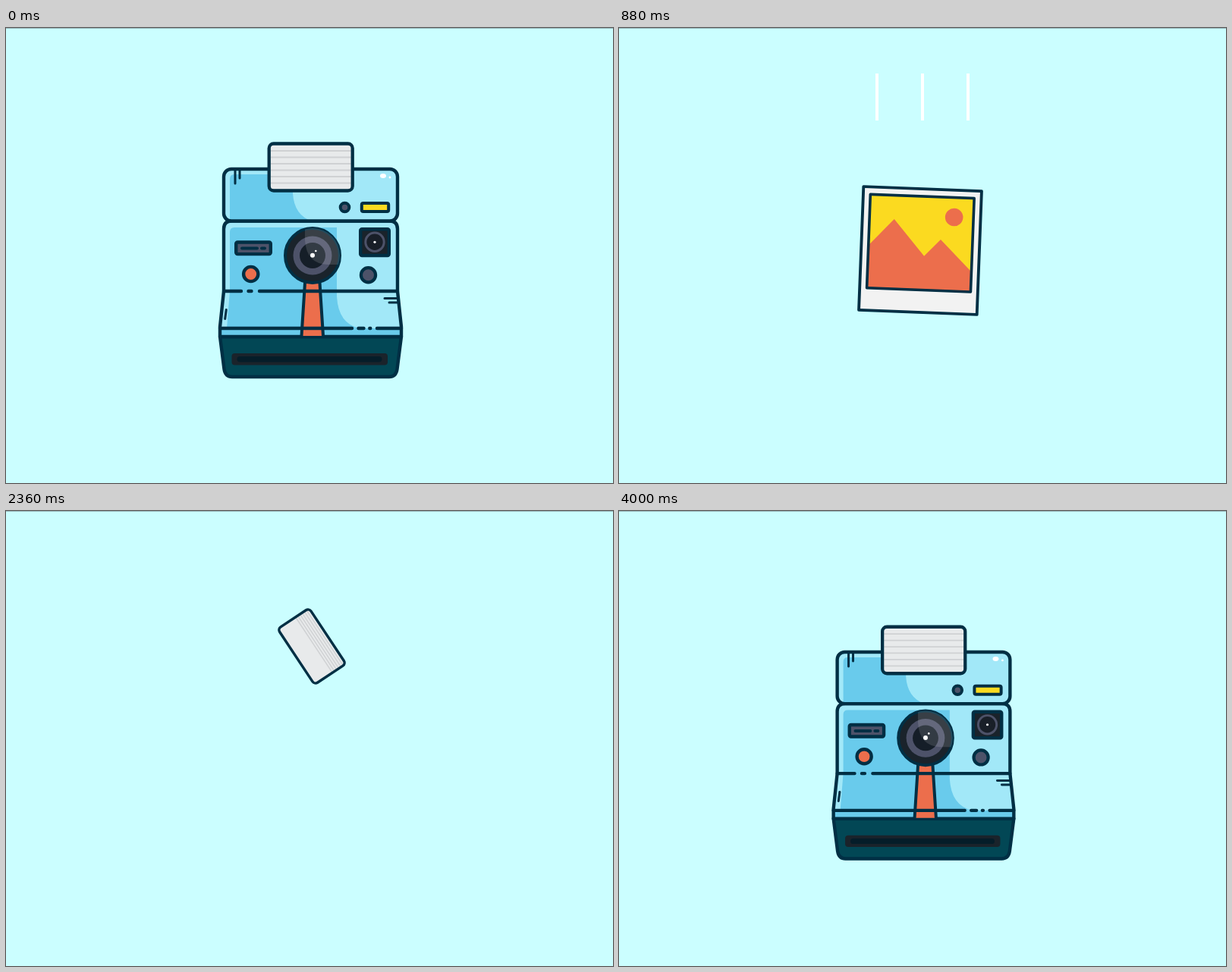
An HTML page with a canvas that plays this animation: 800 by 600 pixels, repeating every 4040 ms.

```html
<!DOCTYPE html>
<html lang="en">
<head>
<meta charset="utf-8">
<title>Instant camera</title>
<style>
html, body { margin: 0; width: 100%; height: 100%; overflow: hidden; background: #cbfeff; }
canvas { display: block; }
</style>
</head>
<body>
<canvas id="stage" width="800" height="600"></canvas>
<script>
const ctx = document.getElementById('stage').getContext('2d');
const LOOP = 4040, CX = 401.7, CY = 183.5;
const NAVY = '#002f44', BLUE = '#69cbec', LIGHT = '#a2e8f8', DEEP = '#024755',
  ORANGE = '#ec6e4c', YELLOW = '#fbda20', GREY = '#4d5269', DARK = '#1a232b';

const clamp = x => Math.min(1, Math.max(0, x));
const part = (t, a, b) => clamp((t - a) / (b - a));
const mix = (a, b, p) => a + (b - a) * p;
const smooth = p => (1 - Math.cos(Math.PI * p)) / 2;
const back = p => 1 + 2.4 * (p - 1) ** 3 + 1.4 * (p - 1) ** 2;

// Eased value through alternating times and values.
function key(t, ...k) {
  let i = 0;
  while (i < k.length - 4 && t > k[i + 2]) i += 2;
  return mix(k[i + 1], k[i + 3], smooth(part(t, k[i], k[i + 2])));
}

function paint(fill, stroke, width = 4.4) {
  if (fill) { ctx.fillStyle = fill; ctx.fill(); }
  if (stroke) { ctx.strokeStyle = stroke; ctx.lineWidth = width; ctx.stroke(); }
}
function box(x, y, w, h, r, fill, stroke, width) {
  ctx.beginPath(); ctx.roundRect(x, y, w, h, r); paint(fill, stroke, width);
}
function disc(x, y, r, fill, stroke, width) {
  ctx.beginPath(); ctx.arc(x, y, r, 0, 7); paint(fill, stroke, width);
}
function shape(d, fill, stroke, width) {
  const p = new Path2D(d);
  if (fill) { ctx.fillStyle = fill; ctx.fill(p); }
  if (stroke) { ctx.strokeStyle = stroke; ctx.lineWidth = width || 4.4; ctx.stroke(p); }
}
function group(fn) { ctx.save(); fn(); ctx.restore(); }

// Scale a part up around a point, starting at time t0.
function pop(t, t0, x, y, fn, dur = 200) {
  if (t <= t0) return;
  const s = Math.max(0, back(part(t, t0, t0 + dur)));
  group(() => {
    ctx.translate(x, y); ctx.scale(s, s); ctx.translate(-x, -y);
    fn();
  });
}

function topBlock(t) {
  group(() => {
    ctx.beginPath(); ctx.roundRect(287, 186, 229, 68.5, 10); ctx.clip();
    ctx.fillStyle = LIGHT; ctx.fillRect(287, 186, 229, 70);
    shape('M295 256V199Q295 193 301 193H378V218Q380 250 408 256Z', BLUE);
  });
  box(287, 186, 229, 68.5, 10, null, NAVY);
  pop(t, 2880, 302, 188, () => shape('M302 188V205M308 188V198', null, NAVY, 3));
  pop(t, 2900, 446.5, 236.5, () => disc(446.5, 236.5, 5.8, GREY, NAVY, 4));
  pop(t, 2940, 486, 236.5, () => box(468.8, 231, 35.4, 11, 2, YELLOW, NAVY, 4));
  pop(t, 3000, 500, 196, () => {
    ctx.beginPath(); ctx.ellipse(497, 195, 4, 3, 0, 0, 7); paint('#fff');
    disc(506, 197, 1.4, '#fff');
  });
}

function strap(t) {
  const fill = part(t, 3280, 3560), edge = part(t, 3200, 3400);
  const left = p => mix(394, 389.5, p), right = p => mix(413.5, 418, p);
  const quad = p => `${left(p)} ${336 + 70 * p}`;
  if (fill > 0) shape(`M394 336H413.5L${right(fill)} ${336 + 70 * fill}L${quad(fill)}Z`, ORANGE);
  if (edge > 0) group(() => {
    ctx.lineCap = 'butt';
    shape(`M394 336L${quad(edge)}M413.5 336L${right(edge)} ${336 + 70 * edge}`, null, NAVY, 4);
  });
}

function lens() {
  disc(404, 300, 36, DARK, NAVY, 4);
  disc(404, 300, 25.5, GREY);
  disc(404, 300, 17, '#151e28');
  group(() => {
    ctx.beginPath(); ctx.arc(404, 300, 36, 0, 7); ctx.clip();
    shape('M394 258V280Q396 311 424 312H445V258Z', 'rgba(255,255,255,.13)');
  });
  disc(404, 299.7, 3, '#fff');
}

function body(t) {
  const outline = 'M287 347V265Q287 254.5 297.5 254.5H505.5Q516 254.5 516 265V347L521 394V407H282V394Z';
  group(() => {
    ctx.clip(new Path2D(outline));
    ctx.fillStyle = LIGHT; ctx.fillRect(280, 250, 245, 160);
    shape('M291 396L295 347V269Q295 263 301 263H436V354Q438 390 466 396Z', BLUE);
    ctx.fillStyle = BLUE; ctx.fillRect(280, 396, 245, 12);
  });
  shape(outline, null, NAVY);
  strap(t);
  pop(t, 2760, 402, 347, () => shape('M287 347H310M319.5 347H323.5M334 347H516', null, NAVY));
  pop(t, 2800, 402, 396, () =>
    shape('M282 396H456M464.5 396H471.5M479.3 396H480.3M489 396H521', null, NAVY));
  pop(t, 2980, 517, 359, () => shape('M499 356.5H516M505 362H517', null, NAVY, 3));
  pop(t, 3000, 289, 377, () => shape('M290.3 371.5L288.7 383.5', null, NAVY, 3));
  pop(t, 2860, 326, 290, () => {
    box(303.2, 282.5, 45.6, 15.6, 2, GREY, NAVY, 4.4);
    shape('M311 290.5H331M337 290.5H341', null, NAVY, 4);
  });
  pop(t, 2820, 486, 282.5, () => {
    box(467.2, 265.2, 37.6, 34.8, 2, DARK, NAVY);
    disc(486, 282.3, 12.2, '#191f28', GREY, 3);
    disc(486, 282.3, 1.6, '#fff');
  });
  pop(t, 3020, 477.5, 325.7, () => disc(477.5, 325.7, 9.6, GREY, NAVY, 4.2));
  pop(t, 3080, 322.7, 324.5, () => disc(322.7, 324.5, 9.6, ORANGE));
  const ring = part(t, 3240, 3420);
  if (ring > 0) disc(322.7, 324.5, 9.6 * ring, null, NAVY, 4.4 * ring);
  pop(t, 2680, 404, 300, lens);
  pop(t, 3310, 408.3, 294, () => disc(408.3, 294, 1.3, '#fff'));
}

function base(t) {
  shape('M282 407H521L515.5 450Q514 460 505 460H298Q289 460 287.5 450Z', DEEP, NAVY);
  pop(t, 3420, 400, 437, () => {
    box(297.5, 429, 205.5, 15.5, 4, DARK);
    box(304.5, 433, 191, 7.5, 3.7, '#051d29');
  }, 240);
}

function camera(t, y) {
  const s = t < 1000 ? key(t, 0, 1, 480, .935) : mix(.9, 1, (t - 3320) / 720);
  const tilt = t < 1000 ? 0 :
    key(t, 2420, 4, 2700, -10, 2980, 10, 3300, -4, 3560, 1.5, 3800, 0);
  const age = t < 1000 ? 9999 : t;
  group(() => {
    ctx.translate(CX, y);
    ctx.rotate(tilt * Math.PI / 180);
    ctx.scale(s, s);
    ctx.translate(-CX, -CY);
    pop(age, 2560, 402, 395, () => base(age));
    pop(age, 2490, 402, 255, () => body(age));
    pop(age, 2420, 402, 190, () => topBlock(age));
  });
}

function picture(t) {
  const s = 1 - key(t, 1740, 0, 1960, 1);
  if (s < .01) return;
  const set = key(t, 1160, 0, 1580, 1), sink = 112 * key(t, 1120, 0, 1500, 1);
  group(() => {
    ctx.translate(0, -11); ctx.scale(s, s); ctx.translate(0, 11);
    group(() => {
      ctx.beginPath(); ctx.rect(-76.5, -80, 153, 138); ctx.clip();
      ctx.fillStyle = YELLOW; ctx.fillRect(-77, -81, 154, 140);
      const a = mix(-.816, -.012, set), r = mix(70, 84, set);
      disc(r * Math.cos(a), r * Math.sin(a), 13.2, ORANGE);
      ctx.translate(0, sink);
      shape('M-80 -1L-40 -45L6 8L29.5 -17.4L80 32V70H-80Z', ORANGE);
    });
    box(-76.5, -80, 153, 138, 0, null, NAVY, 4);
  });
}

// The print that folds into the flash unit.
function card(t, y) {
  const early = t < 710;
  const fold = early ? 1 : key(t, 1760, 0, 2140, 1);
  const s = early ? key(t, 0, 1, 480, .912)
    : t > 2360 ? (t < 3320 ? mix(.8, .85, part(t, 2360, 3320)) : mix(.85, 1, part(t, 3320, LOOP)))
    : key(t, 720, .8, 880, .895, 1080, 1, 2200, 1, 2360, .8);
  const turn = early ? 0 : key(t, 720, 9, 880, 2.2, 1060, -2, 1240, 0, 1520, 0, 1740, -13,
    2200, 88, 2360, 56.5, 2640, -18, 2960, 12, 3310, -7.4, 3560, 2, 3800, 0);
  const w = mix(174, 110, fold), h = mix(182, 62, fold);
  group(() => {
    ctx.translate(early || t > 2700 ? CX : key(t, 720, 396, 880, 397, 1080, 400, 2100, 400, 2360, 403, 2700, CX), y);
    ctx.rotate(turn * Math.PI / 180);
    ctx.scale(s, s);
    box(-w / 2, -h / 2, w, h, 6 * fold, fold < .5 ? '#f2f2f2' : '#e8eaeb');
    const spread = early ? 1 : key(t, 2160, 0, 2560, 1);
    if (spread > 0) group(() => {
      ctx.lineCap = 'butt';
      for (let i = 1; i <= 6; i++) {
        const ly = -30 + 8.5 * i * spread;
        shape(`M-53 ${ly}H53`, null, '#cfd1d3', 1.8);
      }
    });
    box(-w / 2, -h / 2, w, h, 6 * fold, null, NAVY, 4.3);
    if (!early) picture(t);
  });
}

function speedLines(t) {
  const top = key(t, 600, 200, 740, 60), end = key(t, 720, 200, 1020, 60);
  if (t < 600 || end - top < .5) return;
  ctx.fillStyle = '#fff';
  for (const x of [340, 400, 460]) ctx.fillRect(x - 2, top, 4, end - top);
}

function draw(t) {
  ctx.fillStyle = '#cbfeff'; ctx.fillRect(0, 0, 800, 600);
  ctx.lineCap = ctx.lineJoin = 'round';
  speedLines(t);
  if (t < 710) {
    const y = CY + key(t, 0, 0, 480, 32.5) - 52 * Math.max(0, (t - 480) / 80) ** 3;
    camera(t, y);
    card(t, y);
  } else {
    const y = key(t, 710, -110, 880, 293.5, 1060, 301.5, 1760, 301.5, 2140, 180, 2360, 178.5, 2700, CY);
    if (t > 2400) camera(t, y);
    card(t, y);
  }
  ctx.fillStyle = '#9abdc0'; ctx.fillRect(0, 0, 800, 1);
}

const start = performance.now();
function tick() {
  draw((performance.now() - start) % LOOP);
  requestAnimationFrame(tick);
}
tick();
</script>
</body>
</html>
```
